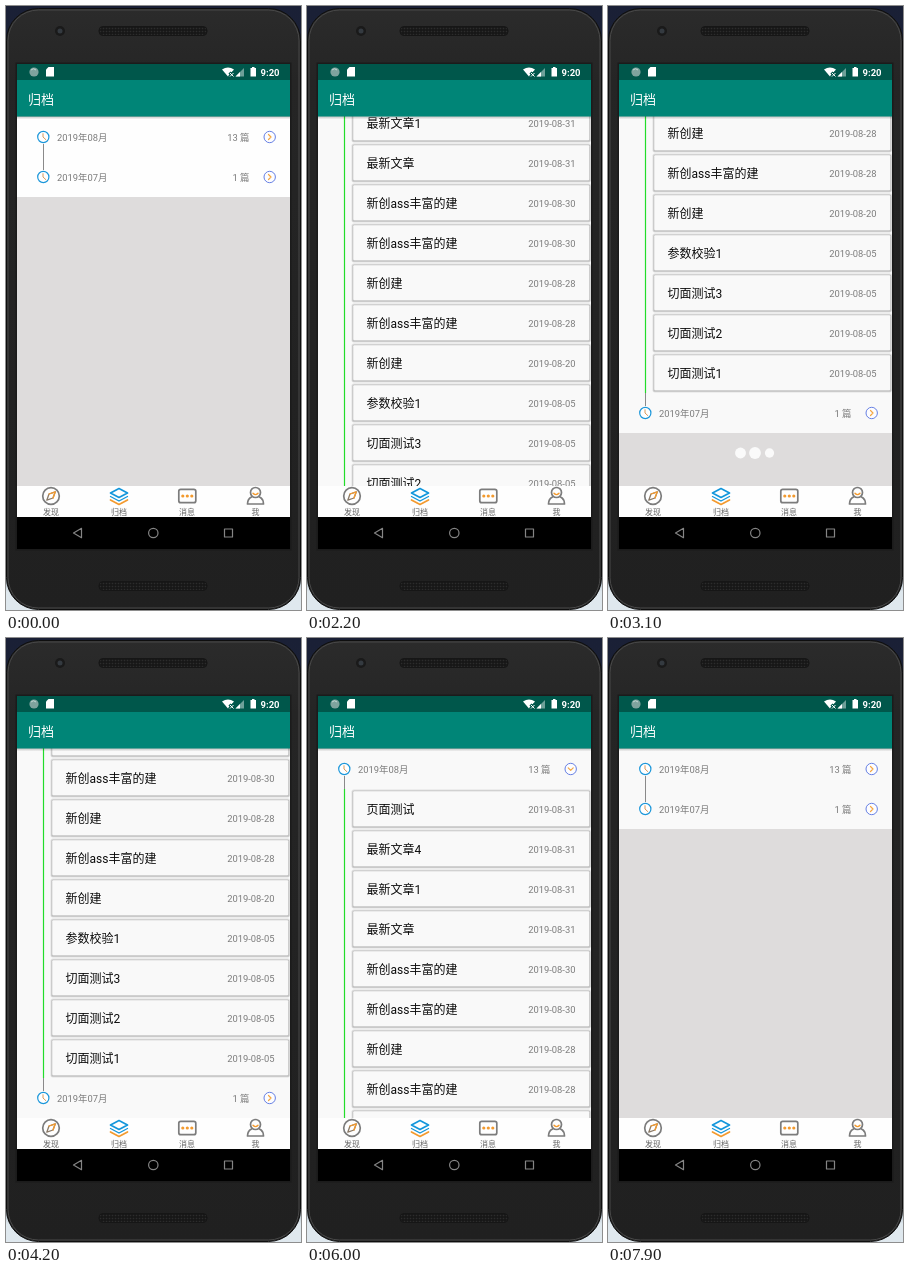
Recreate the animation shown at these times as an HTML page. Size 295 by 604 pixels, loop 8.4 s.

```html
<!DOCTYPE html>
<html lang="zh">
<head>
<meta charset="utf-8">
<style>
html, body { margin: 0; width: 100%; height: 100%; overflow: hidden; background: #222; }
svg { display: block; width: 100vw; height: 100vh; }
text { font-family: Roboto, "Noto Sans CJK SC", "Noto Sans CJK", sans-serif; }
.small { font-size: 9.4px; fill: #7b7b7b; }
.title { font-size: 12px; fill: #0c0c0c; }
.tab { font-size: 8px; fill: #666; text-anchor: middle; }
.end { text-anchor: end; }
.line { fill: none; stroke-linecap: round; stroke-linejoin: round; }
</style>
</head>
<body>
<svg viewBox="0 0 295 604" preserveAspectRatio="none">
  <defs>
    <linearGradient id="wall" x2="0" y2="1">
      <stop offset="0" stop-color="#1a2036"/><stop offset=".5" stop-color="#20242e"/>
      <stop offset=".93" stop-color="#7c8c9c"/><stop offset=".97" stop-color="#dfe8ee"/>
    </linearGradient>
    <linearGradient id="body" x2="0" y2="1">
      <stop offset="0" stop-color="#2b2b2b"/><stop offset=".12" stop-color="#252525"/>
      <stop offset="1" stop-color="#202020"/>
    </linearGradient>
    <linearGradient id="shade" x2="0" y2="1">
      <stop offset="0" stop-color="#000" stop-opacity=".25"/><stop offset="1" stop-color="#000" stop-opacity="0"/>
    </linearGradient>
    <pattern id="mesh" width="3" height="3" patternUnits="userSpaceOnUse">
      <rect width="3" height="3" fill="#171717"/><circle cx="1.5" cy="1.5" r=".8" fill="#2c2c2c"/>
    </pattern>
    <clipPath id="view"><rect x="11" y="110" width="273" height="370"/></clipPath>
  </defs>

  <rect width="295" height="604" fill="url(#wall)"/>
  <rect x=".5" y="2.500" width="294" height="601" rx="32" fill="url(#body)" stroke="#0e0e0e"/>
  <rect x="2" y="4" width="291" height="598" rx="30.500" fill="none" stroke="#484848"/>
  <rect x="9.500" y="56.500" width="276" height="488" fill="#1b1b1b"/>
  <circle cx="54" cy="25" r="5" fill="#1a1a1a"/><circle cx="54" cy="25" r="2.500" fill="#343a40"/>
  <rect x="93" y="20.500" width="108" height="9" rx="4" fill="url(#mesh)" stroke="#161616"/>
  <rect x="93" y="575.500" width="108" height="9" rx="4" fill="url(#mesh)" stroke="#161616"/>

  <g clip-path="url(#view)">
    <rect x="11" y="110" width="273" height="370" fill="#dedcdc"/>
    <g id="list"></g>
    <g id="dots" fill="#fafafa"><circle/><circle/><circle/></g>
  </g>

  <rect x="11" y="58" width="273" height="16" fill="#00574b"/>
  <rect x="11" y="110" width="273" height="3.500" fill="url(#shade)"/>
  <rect x="11" y="74" width="273" height="36.500" fill="#008577"/>
  <text x="22" y="97.500" font-size="13" fill="#fff" font-weight="500">归档</text>
  <circle cx="28" cy="66" r="4.600" fill="#7fa39e"/>
  <path d="M25 64a3.500 3.500 0 0 1 5 0" fill="none" stroke="#c3d6d3"/>
  <path d="M42.500 61H48V70.500H40V63.500Z" fill="#fff"/>
  <path d="M216 63.500Q222 59.500 228 63.500L222 70.500Z" fill="#fff"/>
  <path d="M223.500 66.500l4 4m0-4l-4 4" stroke="#00574b" stroke-width="3"/>
  <path d="M224 67l3.500 3.500m0-3.500l-3.500 3.500" stroke="#fff"/>
  <path d="M238 62V70.500H229.500Z" fill="#6ea099"/><path d="M234 66V70.500H229.500Z" fill="#fff"/>
  <path d="M244.500 62H246V61H248.500V62H250V70.500H244.500Z" fill="#fff"/>
  <text x="254.500" y="69.500" font-size="9.500" font-weight="700" fill="#fff">9:20</text>

  <rect x="11" y="480" width="273" height="31" fill="#fefefe"/>
  <g class="line" stroke="#7c7c7c" stroke-width="1.700">
    <circle cx="45" cy="490" r="8.300"/>
    <path d="M40.800 494.200L43 488L49.300 485.800L47 492Z" stroke="#8a7a68" stroke-width="1.300"/>
    <path d="M43 488L49.300 485.800L47 492" stroke="#f39a2e" stroke-width="1.300"/>
    <path d="M104.500 494L113 498.500L121.500 494" stroke="#f39a2e"/>
    <path d="M104.500 490.500L113 495L121.500 490.500" stroke="#1296db" stroke-width="1.300"/>
    <path d="M113 482.500L121.500 487L113 491.500L104.500 487Z" stroke="#1296db"/>
    <rect x="172.800" y="483.300" width="17" height="13.400" rx="2"/>
    <path d="M176.800 490h.01M181.300 490h.01M185.800 490h.01" stroke="#f39a2e" stroke-width="3.200"/>
    <circle cx="249.500" cy="486.500" r="5"/>
    <path d="M245.500 491Q241.500 493 241.500 498H257.500Q257.500 493 253.500 491"/>
    <path d="M247 487.300Q249.500 490 252 487.300" stroke="#f39a2e" stroke-width="1.400"/>
  </g>
  <text class="tab" x="45" y="508.500">发现</text>
  <text class="tab" x="113" y="508.500">归档</text>
  <text class="tab" x="181" y="508.500">消息</text>
  <text class="tab" x="249.500" y="508.500">我</text>

  <rect x="11" y="511" width="273" height="32" fill="#000"/>
  <g class="line" stroke="#858585" stroke-width="1.200">
    <path d="M75.500 522.300V531.700L67.500 527Z"/><circle cx="147.300" cy="527" r="4.700"/>
    <rect x="218.500" y="523" width="8" height="8"/>
  </g>
</svg>
<script>
const LOOP = 8400, STEP = 100, ROW = 40;
const $ = id => document.getElementById(id);
const posts = [
  ['页面测试', '08-31'], ['最新文章4', '08-31'], ['最新文章1', '08-31'], ['最新文章', '08-31'],
  ['新创ass丰富的建', '08-30'], ['新创ass丰富的建', '08-30'], ['新创建', '08-28'],
  ['新创ass丰富的建', '08-28'], ['新创建', '08-20'], ['参数校验1', '08-05'],
  ['切面测试3', '08-05'], ['切面测试2', '08-05'], ['切面测试1', '08-05']
];
const FULL = posts.length * ROW;

const back = `<rect class="back" x="11" y="-20" width="273" height="${ROW}" fill="#f9f9f9"/>`;

// Rows are drawn around their own vertical centre.
const month = (id, name, count) => `${back}
  <path id="${id}Up" d="M37.500-20V-7" stroke="#8a8a8a"/>
  <path id="${id}Down" d="M37.500 7V20" stroke="#8a8a8a"/>
  <circle cx="37.300" cy="0" r="5.600" fill="#fff" stroke="#1c97da" stroke-width="1.200"/>
  <path class="line" d="M37-3.300V0L39.800 2.600" stroke="#d99a5a"/>
  <text class="small" x="51" y="3.800">${name}</text>
  <text class="small end" x="243.500" y="3.800">${count} 篇</text>
  <circle cx="263.700" cy="0" r="5.700" fill="#fdfdff" stroke="#6680e4"/>
  <path id="${id}Arrow" class="line" d="M-1.200-2.500L1.300 0L-1.200 2.500" stroke="#f5a742" stroke-width="1.200"/>`;

const card = ([name, date], i) => `<g transform="translate(0 ${i * ROW})">${back}
  <path d="M37.500-20V20" stroke="#22dd2a" stroke-width="1.200"/>
  <rect x="44.500" y="-19.500" width="239.500" height="39" rx="2" fill="#e2e2e2"/>
  <rect x="45.300" y="-18.500" width="238" height="37.300" rx="1.500" fill="#c2c2c2"/>
  <rect x="46.300" y="-17.700" width="235.900" height="35" rx="1" fill="#f9f9f9"/>
  <text class="title" x="59.500" y="5">${name}</text>
  <text class="small end" x="268.500" y="3.800">2019-${date}</text></g>`;

$('list').innerHTML = `
  <g id="cards" transform="translate(0 171)">${posts.map(card).join('')}</g>
  <g id="july"><g id="extra" transform="translate(0 ${ROW})">${card(['Hello123', '07-22'], 0)}</g>
    ${month('jul', '2019年07月', 1)}</g>
  <g transform="translate(0 131)">${month('aug', '2019年08月', 13)}</g>`;
$('augUp').style.display = 'none';
const backs = document.querySelectorAll('.back');
const dots = [...$('dots').children];

const clamp = v => Math.min(1, Math.max(0, v));
const ramp = (t, a, b) => clamp((t - a) / (b - a));
const fling = (t, a, b, pow) => 1 - (1 - ramp(t, a, b)) ** pow;
const smooth = u => u * u * (3 - 2 * u);
const bump = (t, a, peak, b) => t < peak
  ? Math.sin(ramp(t, a, peak) * Math.PI / 2)
  : smooth(1 - ramp(t, peak, b));
const within = (t, a, b) => t >= a && t < b;

function arrow(id, open) {
  $(id + 'Arrow').setAttribute('transform', `translate(263.700 0) rotate(${open ? 90 : 0})`);
}

function render(time) {
  const t = Math.floor(time % LOOP / STEP) * STEP;

  const rest = 231 * fling(t, 1900, 2600, 1.55) + ROW * smooth(ramp(t, 4500, 4900))
    - 271 * smooth(ramp(t, 5300, 6000));
  const pull = 53 * bump(t, 2700, 3100, 3400) + 48 * bump(t, 4500, 4900, 5200);
  const scroll = Math.round(rest + pull);
  $('list').setAttribute('transform', `translate(0 ${-scroll})`);

  const shown = ramp(t, 1300, 1500) * (1 - ramp(t, 6400, 6600));
  $('cards').setAttribute('opacity', shown);
  const shift = FULL * (t < 1400 ? 0 : 1 - smooth(ramp(t, 6500, 6800)));
  $('july').setAttribute('transform', `translate(0 ${171 + shift})`);
  const extra = ramp(t, 4300, 4500) * (1 - ramp(t, 7500, 7900));
  $('extra').setAttribute('opacity', extra);
  $('julDown').setAttribute('opacity', extra);

  arrow('aug', within(t, 1000, 6500));
  arrow('jul', within(t, 4300, 7600));
  const tone = t < 1000 ? '#fefefe' : '#f9f9f9';
  backs.forEach(b => b.setAttribute('fill', tone));

  $('dots').style.display = pull > 1 ? '' : 'none';
  const base = 171 + FULL + (extra > 0 ? ROW : 0) + ROW - scroll;
  dots.forEach((d, i) => {
    d.setAttribute('cx', 132.5 + i * 14.5);
    d.setAttribute('cy', base);
    d.setAttribute('r', 5.2 + 0.8 * Math.cos((t - 3100) / 130 - (i - 0.7) * 1.8));
  });
}

const start = performance.now();
function tick() {
  render(performance.now() - start);
  requestAnimationFrame(tick);
}
render(0);
requestAnimationFrame(tick);
</script>
</body>
</html>
```
